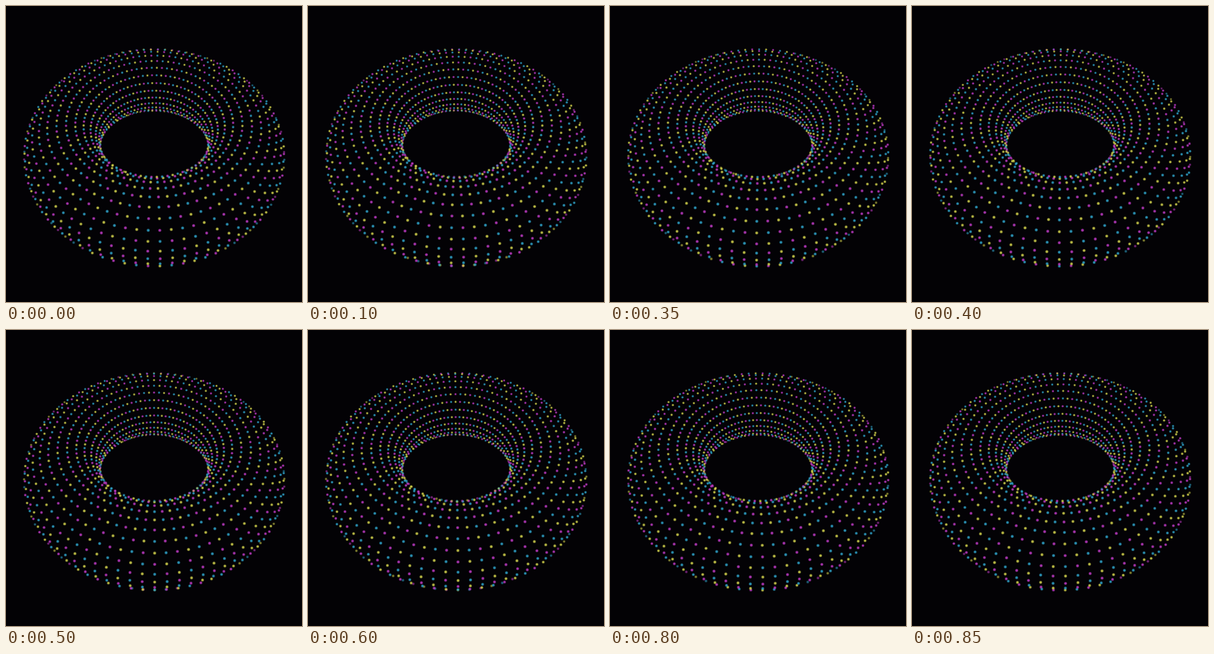
An HTML page with a canvas for the animation above (900 ms loop, 498x498 px).

```html
<!DOCTYPE html>
<html lang="en">
<head>
<meta charset="utf-8">
<title>Dotted torus</title>
<style>
  html, body { margin: 0; width: 100%; height: 100%; overflow: hidden; background: #030205; }
  canvas { display: block; }
</style>
</head>
<body>
<canvas id="stage" width="498" height="498"></canvas>
<script>
const ctx = document.getElementById('stage').getContext('2d');
const { sin, cos, PI, floor } = Math;

const LOOP = 900, STEP = 50;
const COLS = 84, ROWS = 27;
const TUBE = 0.3975;                   // tube radius, ring radius is 1
const CAM = 3.75, FOCAL = 563.5, TILT = 49.4 * PI / 180;
const CX = 249.4, CY = 222.4, DOT = 0.0104;
const RIM = -0.45;                     // dots just past the rim still show
const ST = sin(TILT), CT = cos(TILT);
const COLORS = ['200,62,206', '222,222,80', '50,172,212'];

function disc(x, y, r, rgb, alpha) {
  ctx.fillStyle = `rgba(${rgb},${alpha})`;
  ctx.beginPath();
  ctx.arc(x, y, r, 0, 2 * PI);
  ctx.fill();
}

function dot(u, v, rgb) {
  const su = sin(u), cu = cos(u), sv = sin(v), cv = cos(v);
  const facing = CAM * (CT * cu * cv + ST * sv) - cv - TUBE;
  if (facing < RIM) return;
  const ring = 1 + TUBE * cv, z = TUBE * sv, near = ring * cu;
  const k = FOCAL / (CAM - near * CT - z * ST);
  const x = CX + ring * su * k;
  const y = CY + (near * ST - z * CT) * k;
  const r = DOT * k;
  const light = facing < 0 ? 0.6 : 1;
  disc(x, y, r + 0.6, rgb, 0.36 * light);
  disc(x, y, r - 0.2, rgb, 0.72 * light);
}

// Each loop carries every dot one column round and two rows up,
// onto a place of the same colour.
function draw(p) {
  ctx.fillStyle = '#030205';
  ctx.fillRect(0, 0, 498, 498);
  for (let i = 0; i < COLS; i++) {
    const u = (i - 0.52 + p) * 2 * PI / COLS;
    for (let j = 0; j < ROWS; j++) {
      const v = (j + 0.87 + 2 * p) * 2 * PI / ROWS;
      dot(u, v, COLORS[(i + j + 2) % 3]);
    }
  }
}

const start = performance.now();
function tick() {
  const t = (performance.now() - start) % LOOP;
  draw(floor(t / STEP) * STEP / LOOP);
  requestAnimationFrame(tick);
}
tick();
</script>
</body>
</html>
```
